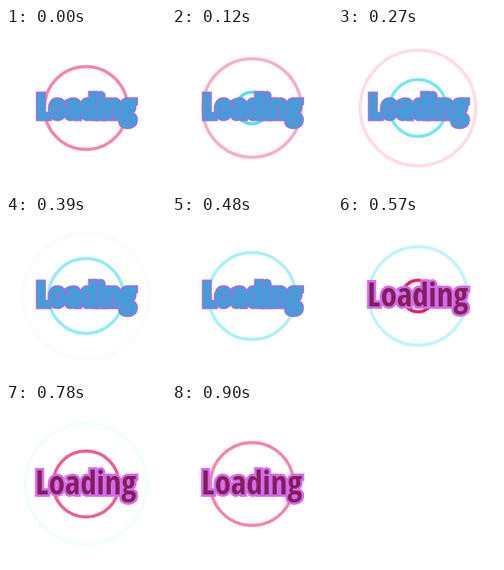
An HTML page that plays this animation: 200 by 200 pixels, repeating every 0.93 s.

```html
<!DOCTYPE html>
<html lang="en">
<head>
<meta charset="utf-8">
<title>Loading</title>
<style>
  html, body { margin: 0; width: 100%; height: 100%; overflow: hidden; background: #fff; }
  svg { display: block; width: 100vw; height: 100vh; }
  circle { fill: none; stroke-width: 4; }
  text {
    font-family: "Open Sans Condensed", "Open Sans", "Noto Sans", sans-serif;
    font-stretch: 75%;
    text-anchor: middle;
    stroke-linejoin: miter;
    stroke-miterlimit: 2;
  }
  .heavy { font-weight: 800; letter-spacing: -.02em; }
  .light { font-weight: 700; letter-spacing: .02em; }
  .heavy .rim { fill: #8c79d9; stroke: #8c79d9; stroke-width: 7; }
  .heavy .face { fill: #3fa0d8; stroke: #3fa0d8; stroke-width: 2; }
  .light .rim { fill: #d06cf0; stroke: #d06cf0; stroke-width: 6; }
  .light .face { fill: #861f58; }
</style>
</head>
<body>
<svg viewBox="0 0 200 200">
  <circle id="pink" cx="100" cy="100" stroke="#e90c59"/>
  <circle id="cyan" cx="100" cy="100" stroke="#46dff0"/>
  <g id="heavy" class="heavy">
    <text class="rim" x="100" y="112.5" aria-hidden="true">Loading</text>
    <text class="face" x="100" y="112.5">Loading</text>
  </g>
  <g id="light" class="light">
    <text class="rim" x="100" y="112.5" aria-hidden="true">Loading</text>
    <text class="face" x="100" y="112.5">Loading</text>
  </g>
</svg>
<script>
const LOOP = 930, STEP = 30, PERIOD = 900, SWITCH = 570, MAX_RADIUS = 80, WORD_WIDTH = 125;
const byId = id => document.getElementById(id);
const pink = byId('pink'), cyan = byId('cyan'), heavy = byId('heavy'), light = byId('light');

function bezier(x1, y1, x2, y2) {
  const at = (s, a, b) => 3 * (1 - s) ** 2 * s * a + 3 * (1 - s) * s * s * b + s ** 3;
  return x => {
    let low = 0, high = 1;
    for (let i = 0; i < 24; i++) {
      const mid = (low + high) / 2;
      if (at(mid, x1, x2) < x) low = mid; else high = mid;
    }
    return at(low, y1, y2);
  };
}
const grow = bezier(0, .2, .8, 1);
const fade = bezier(.2, 0, .8, 1);

// Choose the type size that gives the word its natural width
for (const text of document.querySelectorAll('text')) {
  text.style.fontSize = '100px';
  text.style.fontSize = 100 * WORD_WIDTH / text.getComputedTextLength() + 'px';
}

function ripple(circle, phase) {
  circle.setAttribute('r', MAX_RADIUS * grow(phase));
  circle.setAttribute('opacity', 1 - fade(phase));
}

// The last step of the loop repeats the first ripple pose
function draw() {
  const time = Math.floor(performance.now() % LOOP / STEP) * STEP;
  const phase = time / PERIOD % 1;
  ripple(cyan, phase);
  ripple(pink, (phase + .5) % 1);
  heavy.style.display = time < SWITCH ? '' : 'none';
  light.style.display = time < SWITCH ? 'none' : '';
  requestAnimationFrame(draw);
}
draw();
</script>
</body>
</html>
```
